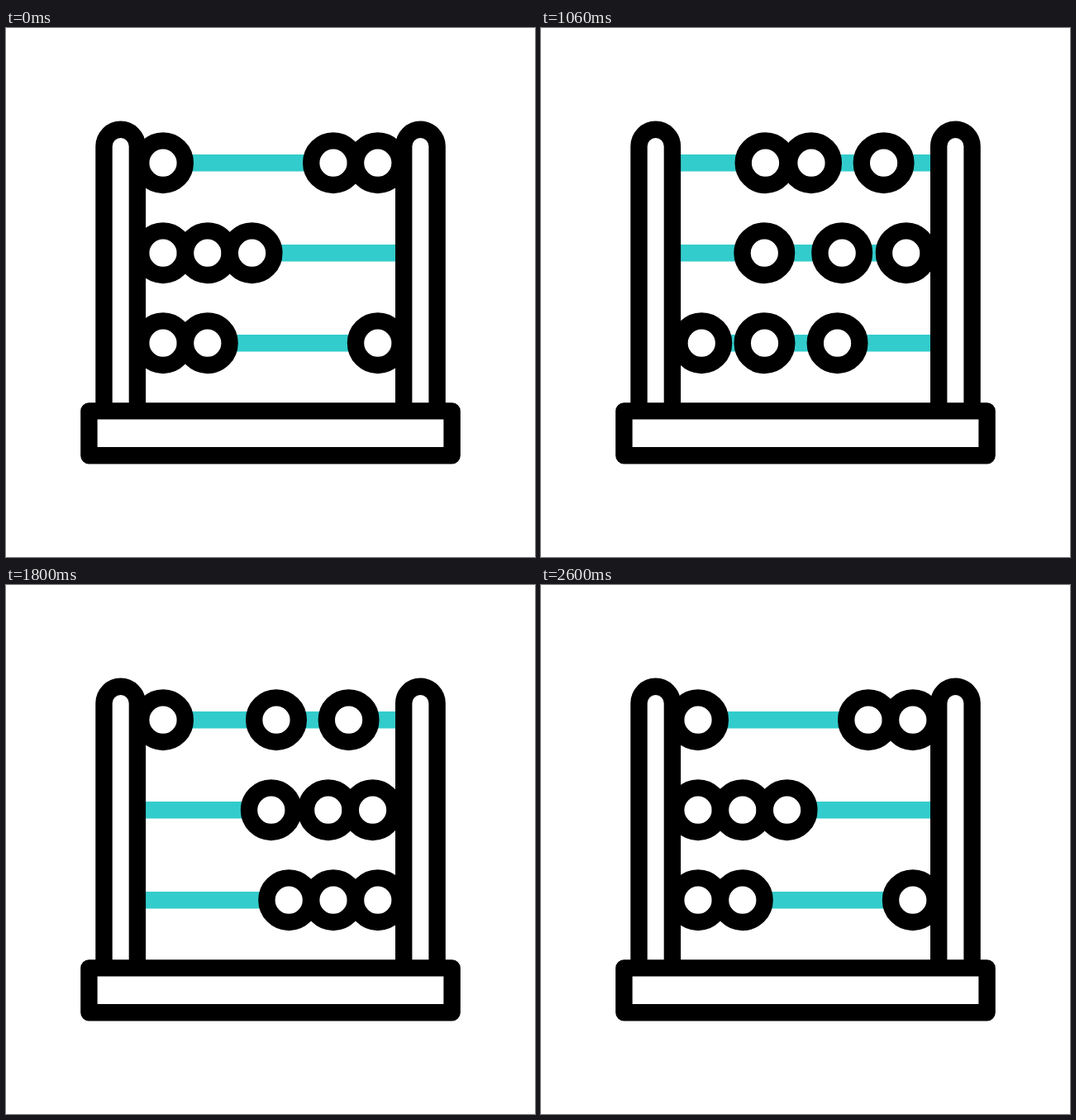
These frames come from a looping animation (640x640 px, 3000 ms). An HTML page:

```html
<!DOCTYPE html>
<html lang="en">
<head>
<meta charset="utf-8">
<title>Abacus</title>
<style>
  html, body { margin: 0; width: 100%; height: 100%; overflow: hidden; background: #fff; }
  svg { display: block; width: 100vw; height: 100vh; }
  .frame, .bead { fill: #fff; stroke: #000; stroke-width: 20.4; stroke-linejoin: round; }
  .rod { stroke: #3cc; stroke-width: 20.4; }
</style>
</head>
<body>
<svg viewBox="0 0 640 640">
  <g id="rows"></g>
  <path class="frame" d="M118.5 463.5V143a20.2 20.2 0 0 1 40.4 0V463.5"/>
  <path class="frame" d="M481.2 463.5V143a20.2 20.2 0 0 1 40.4 0V463.5"/>
  <rect class="frame" x="100.4" y="463.4" width="439.2" height="53.8"/>
</svg>
<script>
const LOOP = 3000, STEP = 20;

// Each bead: resting x, then moves as [start ms, end ms, x]
const rows = [
  { y: 163.2, beads: [
    { x: 190, moves: [[200, 800, 271.5], [1200, 1700, 190]] },
    { x: 396, moves: [[200, 800, 327], [1800, 2300, 396]] },
    { x: 449.8, moves: [[400, 1000, 414.6], [1800, 2300, 449.8]] }
  ] },
  { y: 272.2, beads: [
    { x: 190, moves: [[740, 1340, 336]] .concat([[1700, 2200, 190]]) },
    { x: 243.8, moves: [[620, 1220, 389.8], [1800, 2400, 243.8]] },
    { x: 297.6, moves: [[500, 1100, 443.6], [1900, 2600, 297.6]] }
  ] },
  { y: 381.2, beads: [
    { x: 190, moves: [[1000, 1600, 342.2], [1900, 2500, 190]] },
    { x: 243.8, moves: [[900, 1500, 396], [1900, 2600, 243.8]] },
    { x: 449.8, moves: [[200, 800, 297.6], [800, 1400, 449.8]] }
  ] }
];

const layer = document.getElementById("rows");

function add(name, attrs) {
  const el = document.createElementNS("http://www.w3.org/2000/svg", name);
  for (const key in attrs) el.setAttribute(key, attrs[key]);
  return layer.appendChild(el);
}

function ease(t) {
  t = Math.min(1, Math.max(0, t));
  return t * t * (3 - 2 * t);
}

function beadX(bead, time) {
  let x = bead.x;
  for (const [start, end, to] of bead.moves) {
    x += (to - x) * ease((time - start) / (end - start));
  }
  return x;
}

for (const { y, beads } of rows) {
  add("line", { class: "rod", x1: 160, x2: 480, y1: y, y2: y });
  for (const bead of beads) {
    bead.el = add("circle", { class: "bead", cy: y, r: 26.8 });
  }
}

function draw(ms) {
  const time = Math.floor((ms % LOOP) / STEP) * STEP;
  for (const { beads } of rows) {
    for (const bead of beads) {
      bead.el.setAttribute("cx", beadX(bead, time).toFixed(2));
    }
  }
}

let origin = null;
function tick(now) {
  if (origin === null) origin = now;
  draw(now - origin);
  requestAnimationFrame(tick);
}

draw(0);
requestAnimationFrame(tick);
</script>
</body>
</html>
```
